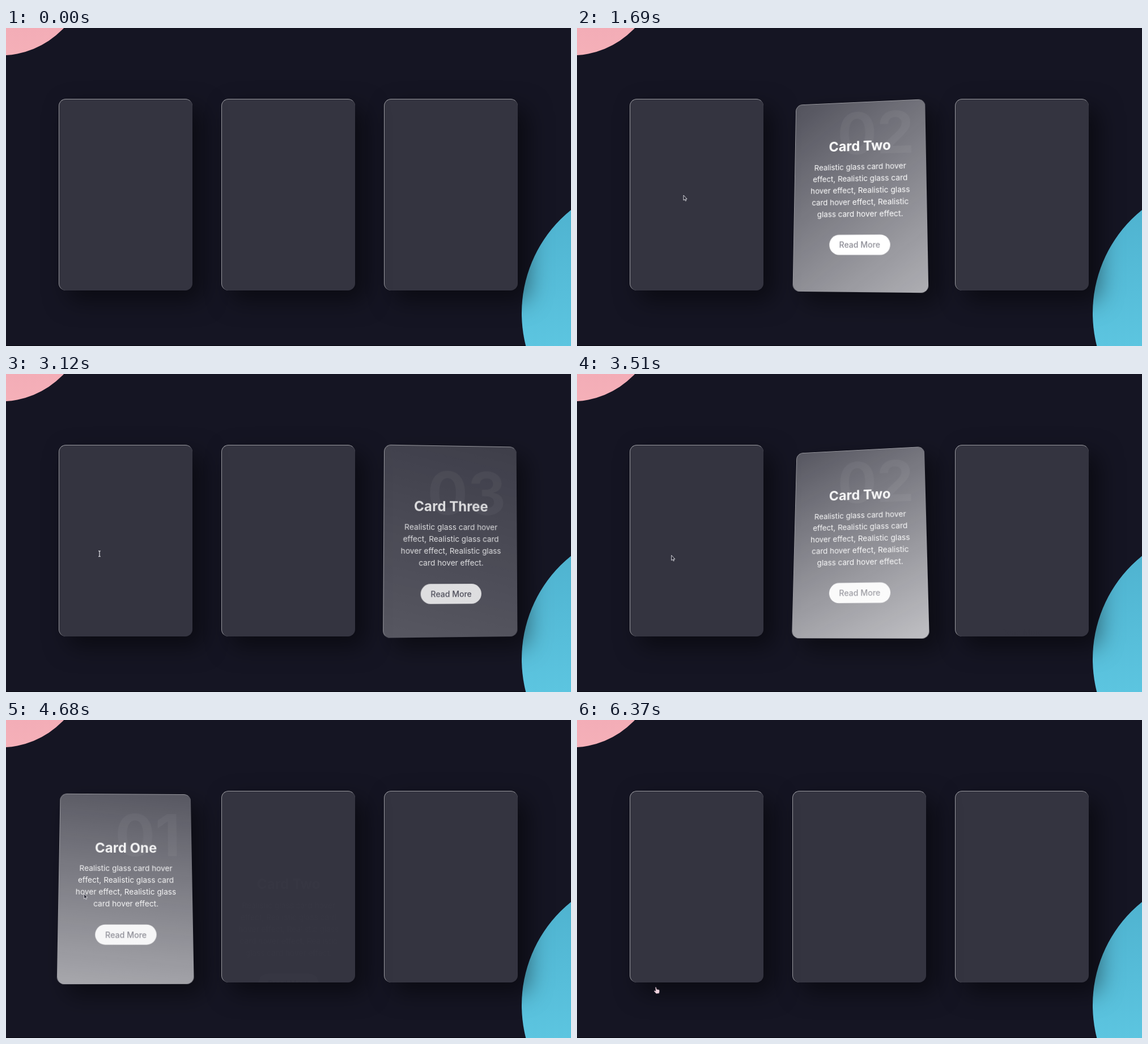
An HTML page for the animation above (6500 ms loop, 997 px wide and 561 px high).

```html
<!DOCTYPE html>
<html lang="en">
<head>
<meta charset="utf-8">
<title>Glass cards</title>
<style>
  html, body { margin: 0; width: 100%; height: 100%; overflow: hidden; background: #151523; }
  #stage { position: relative; width: 997px; height: 561px; overflow: hidden; background: #151523; font-family: Inter, sans-serif; }
  #stage > svg { position: absolute; left: 0; top: 0; }
  .card {
    position: absolute; top: 125.3px; width: 236.4px; height: 337.6px; box-sizing: border-box;
    border-radius: 12.5px; overflow: hidden; background: rgba(255,255,255,.135);
    border-top: 1px solid rgba(255,255,255,.5); border-left: 1px solid rgba(255,255,255,.5);
    box-shadow: 17px 17px 42px rgba(0,0,0,.5);
    display: flex; align-items: center; justify-content: center;
  }
  .content { position: relative; width: 100%; text-align: center; color: #fff; }
  .num {
    position: absolute; right: 20px; top: -56px; line-height: 100px;
    font-size: 106px; font-weight: 700; color: rgba(255,255,255,.05);
  }
  h3 { position: relative; margin: 0; font-size: 24.2px; line-height: 36px; font-weight: 700; }
  p { position: relative; margin: 8.4px 0 0; font-size: 13.7px; line-height: 21.1px; white-space: nowrap; }
  .btn {
    display: block; width: 107px; height: 35px; margin: 25.4px auto 0; border-radius: 17.5px;
    background: #fff; color: #2c2c3c; font-size: 14px; line-height: 35px; font-weight: 500;
  }
  .glare {
    position: absolute; left: 50%; top: 50%; width: 675px; height: 675px; margin: -337.5px;
    background: linear-gradient(0deg, rgba(255,255,255,0), #fff);
  }
</style>
</head>
<body>
<div id="stage">
  <svg width="997" height="561">
    <defs>
      <linearGradient id="pink" x1="0" y1="0" x2="0" y2="1">
        <stop offset=".6" stop-color="#f0a8b5"/><stop offset="1" stop-color="#f5b0b8"/>
      </linearGradient>
      <linearGradient id="blue" gradientUnits="userSpaceOnUse" x1="0" y1="320" x2="0" y2="561">
        <stop offset="0" stop-color="#4fb3d0"/><stop offset="1" stop-color="#5cc5e0"/>
      </linearGradient>
    </defs>
    <rect y="560" width="997" height="1" fill="#090911"/>
    <circle cx="-10" cy="-105.6" r="154" fill="url(#pink)"/>
    <circle cx="1144" cy="503" r="234" fill="url(#blue)"/>
  </svg>
  <svg id="cursors" width="997" height="561" style="z-index:2">
    <path id="arrow" d="M0 0V9L2 7.2L3.4 10.2L4.8 9.5L3.5 6.7H6.1Z" fill="#22222e" stroke="#e8e8ee" stroke-width=".9"/>
    <path id="beam" d="M-2 -5Q0 -5 0 -4Q0 -5 2 -5M0 -4V4M-2 5Q0 5 0 4Q0 5 2 5" fill="none" stroke="#e4e4ea" stroke-width="1.2"/>
    <path id="hand" d="M-2.5 -5.5Q-1.5 -6.5 -.8 -5.5L.2 -2L4 -1.2Q5.4 -.6 5.2 1.5L4.4 5.2L-.6 6L-4.6 1.4Q-4.6 0 -3 .4L-1.6 1.2Z" fill="#f0d3de" stroke="#33303f" stroke-width=".6"/>
  </svg>
</div>
<script>
const LOOP = 6500, STEP = 130, W = 236.4, H = 337.6, TOP = 125.3, MAX = 15;
const stage = document.getElementById('stage');

// visits: [enter, leave] times of the pointer
const cards = [
  { name: 'One', x: 92.8, lines: 4, visits: [[400, 1150], [4350, 4980]] },
  { name: 'Two', x: 379.8, lines: 5, visits: [[1240, 1860], [3150, 4250], [5070, 5800]] },
  { name: 'Three', x: 666.8, lines: 4, visits: [[1980, 3044]] }
];
const text = ['Realistic glass card hover', 'effect, Realistic glass card', 'hover effect, Realistic glass'];
const endings = { 4: ['card hover effect.'], 5: ['card hover effect, Realistic', 'glass card hover effect.'] };

// pointer path: time, x, y
const path = [
  [400, 93, 300], [650, 220, 350], [910, 298, 405], [1150, 329, 400], [1240, 380, 390],
  [1690, 562, 377], [1860, 616, 375], [1980, 667, 370], [2350, 825, 385], [2600, 840, 410],
  [3044, 667, 392], [3150, 616, 410], [4030, 483, 422], [4250, 380, 410], [4350, 329, 400],
  [4650, 190, 380], [4980, 329, 330], [5070, 380, 320], [5460, 469, 314], [5800, 498, 463]
];
const cursorPath = [
  [1300, 196, 290], [1690, 188, 295], [3120, 165, 317], [4030, 169, 323.5], [5460, 100, 286], [6370, 140.5, 477]
];

const clamp = v => Math.max(0, Math.min(1, v));

function bezier(x1, y1, x2, y2) {
  const at = (a, b, s) => 3 * (1 - s) ** 2 * s * a + 3 * (1 - s) * s * s * b + s ** 3;
  return x => {
    if (x <= 0 || x >= 1) return clamp(x);
    let lo = 0, hi = 1;
    for (let i = 0; i < 24; i++) {
      const mid = (lo + hi) / 2;
      if (at(x1, x2, mid) < x) lo = mid; else hi = mid;
    }
    return at(y1, y2, lo);
  };
}
const ease = bezier(.25, .1, .25, 1);
const snap = bezier(.03, .98, .52, .99);

function along(keys, t) {
  if (t <= keys[0][0]) return keys[0].slice(1);
  for (let i = 1; i < keys.length; i++) {
    const a = keys[i - 1], b = keys[i];
    if (t <= b[0]) {
      const k = (t - a[0]) / (b[0] - a[0]);
      return [a[1] + (b[1] - a[1]) * k, a[2] + (b[2] - a[2]) * k];
    }
  }
  return keys[keys.length - 1].slice(1);
}

function build(c, i) {
  const el = document.createElement('div');
  el.className = 'card';
  el.style.left = c.x + 'px';
  el.innerHTML = `<div class="content"><div class="num">0${i + 1}</div><h3>Card ${c.name}</h3>
    <p>${text.concat(endings[c.lines]).join('<br>')}</p><span class="btn">Read More</span></div>
    <div class="glare"></div>`;
  stage.appendChild(el);
  c.el = el;
  c.content = el.querySelector('.content');
  c.glare = el.querySelector('.glare');
}

function drawCard(c, t) {
  const visit = c.visits.filter(v => v[0] <= t).pop();
  let shown = 0, tilt = 0, px = .5, py = .5;
  if (visit) {
    const [enter, leave] = visit, last = Math.min(t, leave);
    const [mx, my] = along(path, last);
    px = clamp((mx - c.x) / W);
    py = clamp((my - TOP) / H);
    const level = (fn, ms) => fn((last - enter) / ms) * (1 - fn((t - last) / ms));
    shown = level(ease, 500);
    tilt = level(snap, 400);
  }
  const rx = (py * 2 - 1) * MAX * tilt, ry = (1 - px * 2) * MAX * tilt;
  const aim = Math.atan2((px - .5) * W, (.5 - py) * H) * 180 / Math.PI;
  const turn = ((aim % 360) + 360) % 360 - 180;
  c.el.style.transform = `perspective(844px) rotateX(${rx}deg) rotateY(${ry}deg)`;
  c.content.style.transform = `translateY(${84.4 * (1 - shown)}px)`;
  c.content.style.opacity = shown;
  c.glare.style.transform = `rotate(${180 + turn * tilt}deg)`;
  c.glare.style.opacity = py * tilt;
}

function drawCursor(t) {
  const shape = t < 1300 ? '' : t >= 5980 ? 'hand' : t > 2900 && t < 3300 ? 'beam' : 'arrow';
  const [x, y] = along(cursorPath, t);
  for (const id of ['arrow', 'beam', 'hand']) {
    const el = document.getElementById(id);
    el.style.display = id === shape ? '' : 'none';
    el.setAttribute('transform', `translate(${x} ${y})`);
  }
}

function draw(t) {
  cards.forEach(c => drawCard(c, t));
  drawCursor(t);
}

cards.forEach(build);
draw(0);
const start = performance.now();
function tick() {
  const t = (performance.now() - start) % LOOP;
  draw(Math.floor(t / STEP) * STEP);
  requestAnimationFrame(tick);
}
requestAnimationFrame(tick);
</script>
</body>
</html>
```
